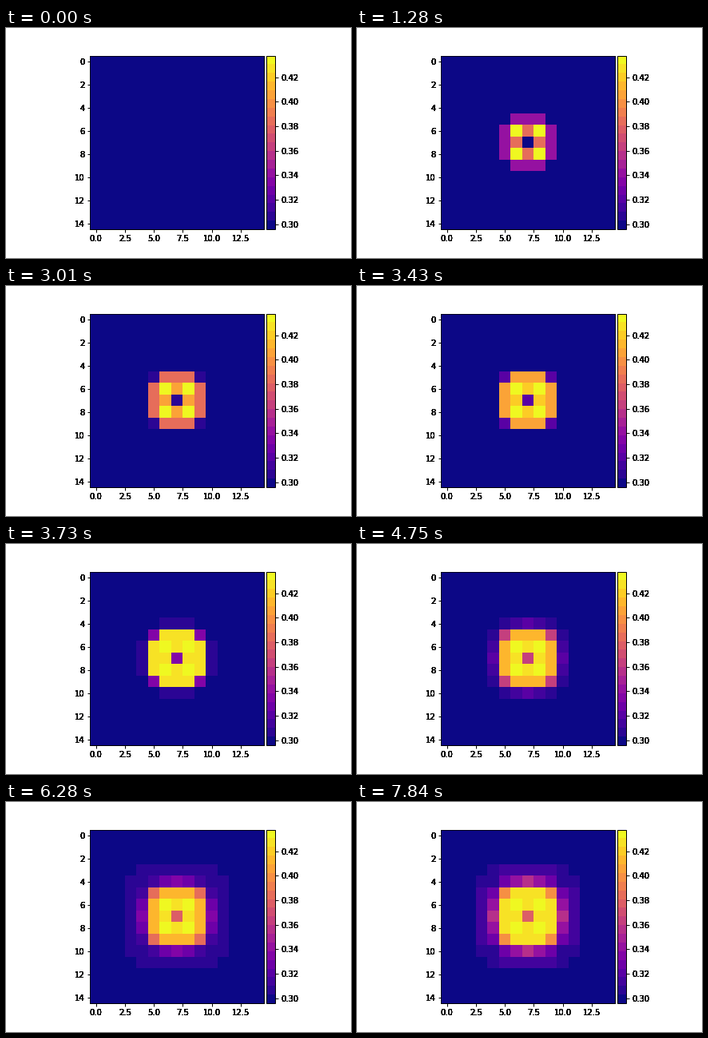
A matplotlib script that plays this animation: 432x288 px, repeating every 8000 ms.

```python
import numpy as np
import matplotlib.pyplot as plt
from matplotlib.animation import FuncAnimation
from mpl_toolkits.axes_grid1 import make_axes_locatable

LOOP_MS, STEP_MS = 8000, 40
SIZE, LEVELS = 15, 20
TOP = LEVELS - 1
VMIN, VMAX = 0.29594, 0.43774
START = 1.28      # seconds before the first cells light up
TEXT_PASSES = 10  # overlaid passes give the hard, heavy label edges

plt.rcParams.update({"font.family": "DejaVu Sans", "font.size": 10})

# Distance from the centre cell along the longer and the shorter direction.
offset = np.abs(np.arange(SIZE) - SIZE // 2)
far = np.maximum.outer(offset, offset)
near = np.minimum.outer(offset, offset)
falloff = np.exp(-1.67 * (near / np.maximum(far, 1)) ** 2)


def ramp(t, start, rate):
    return rate * max(t - start, 0)


def field(t):
    """Cell values at time t: a block that fills up and leaks outwards."""
    levels = np.zeros((SIZE, SIZE))
    if t >= START:
        corner = 15.5 * (1 - np.exp(-ramp(t, 2.9, 1 / 2.13)))
        edge = np.interp(t, (2.2, 3.01, 3.73, 4.75, 6.28, 7.84),
                         (6.5, 11.4, 18, 16.5, 16.2, 18))
        levels[far == 4] = ramp(t, 4.6, 0.75)
        levels[far == 3] = ramp(t, 3.2, 1.65)
        levels *= falloff
        levels[far == 2] = edge
        levels[(far == 2) & (near == 2)] = corner
        levels[far == 1] = np.interp(t, (2.2, 3.73), (11.5, 18))
        levels[near == 1] = np.where(far[near == 1] == 1, TOP,
                                     levels[near == 1])
        levels[far == 0] = min(corner, 11.3)
    return VMIN + (np.round(levels) + 0.5) / LEVELS * (VMAX - VMIN)


def label(ax, side, positions, fmt):
    """Set ticks on one side and write heavy tick labels."""
    if side == "bottom":
        ax.set_xticks(positions)
        trans, va, ha = ax.get_xaxis_text1_transform(7)
    else:
        ax.set_yticks(positions)
        get = (ax.get_yaxis_text1_transform if side == "left"
               else ax.get_yaxis_text2_transform)
        trans, va, ha = get(7)
    for p in positions:
        xy = {"bottom": (p, 0), "left": (0, p), "right": (1, p)}[side]
        for _ in range(TEXT_PASSES):
            ax.text(*xy, fmt.format(p), transform=trans, va=va, ha=ha)


fig, ax = plt.subplots(figsize=(6, 4), dpi=72, facecolor="white")
fig.subplots_adjust(left=0.125, right=0.9, bottom=0.125, top=0.88)
image = ax.imshow(field(0), cmap=plt.get_cmap("plasma", LEVELS),
                  vmin=VMIN, vmax=VMAX, interpolation="nearest")
cax = make_axes_locatable(ax).append_axes("right", size="5%", pad=0.05)
bar = fig.colorbar(image, cax=cax)
bar.outline.set_linewidth(1)
ax.spines[["right", "bottom"]].set_linewidth(1)
for axes in (ax, cax):
    axes.tick_params(width=1, labelleft=False, labelright=False,
                     labelbottom=False)

label(ax, "bottom", np.arange(0, 13, 2.5), "{:.1f}")
label(ax, "left", range(0, SIZE, 2), "{}")
label(cax, "right", np.linspace(0.30, 0.42, 7), "{:.2f}")


def update(i):
    image.set_data(field((i * STEP_MS + 30) / 1000))
    return (image,)


anim = FuncAnimation(fig, update, frames=LOOP_MS // STEP_MS,
                     interval=STEP_MS, repeat=True, repeat_delay=0)
plt.show()
```
